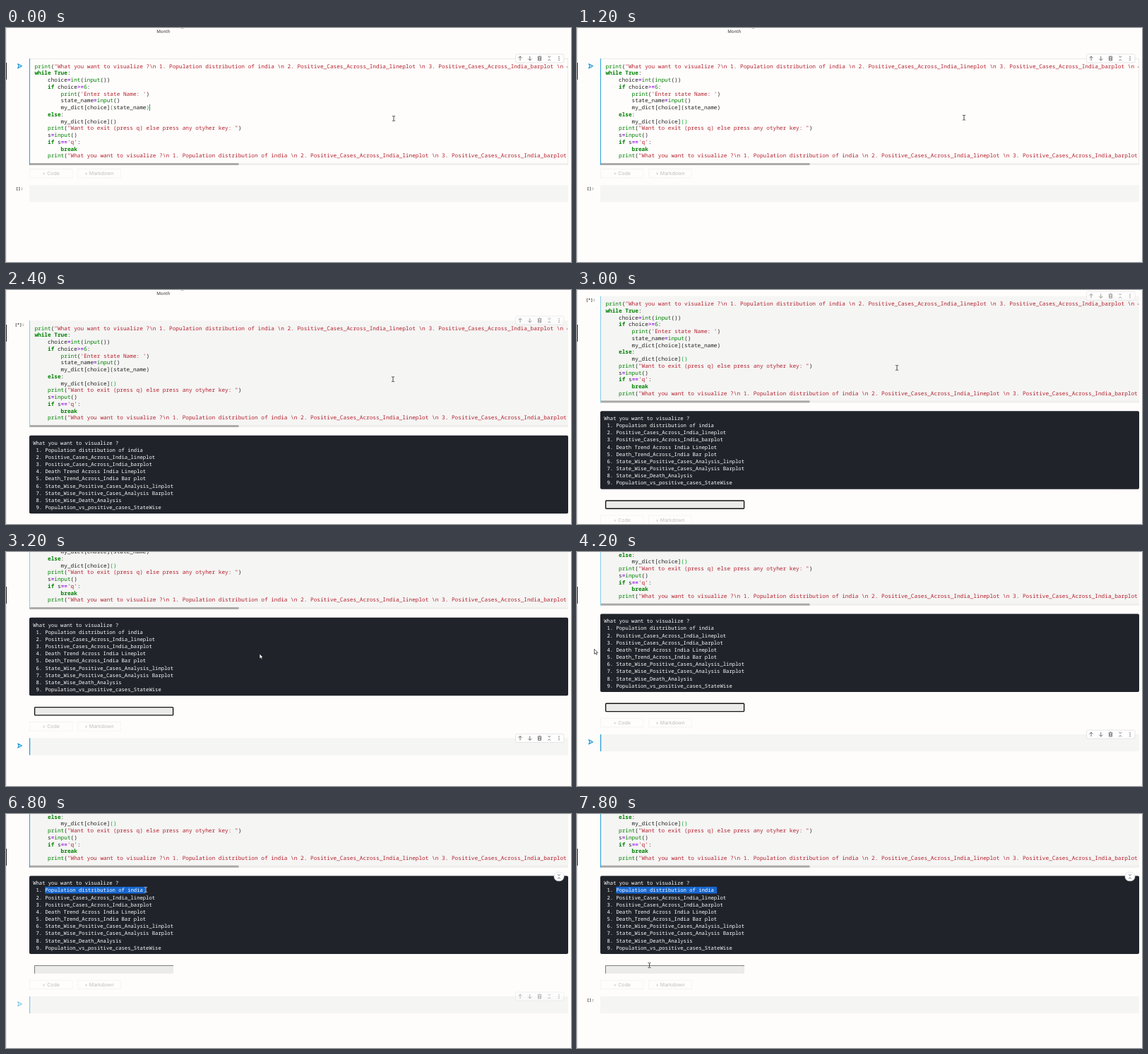
An HTML page that plays this animation: 800x331 px, repeating every 8 s.

```html
<!DOCTYPE html>
<html lang="en">
<head>
<meta charset="utf-8">
<title>Notebook run</title>
<style>
  html, body { margin: 0; width: 100%; height: 100%; overflow: hidden; background: #fefdfc; }
  svg { display: block; width: 800px; height: 331px; }
  text { white-space: pre; text-rendering: geometricPrecision; }
  .code { font: 500 7.75px "Roboto Mono", "Noto Sans Mono", "Liberation Mono", monospace; fill: #212121; }
  .out { font: 500 7.21px "Roboto Mono", "Noto Sans Mono", "Liberation Mono", monospace; fill: #fff; }
  .prompt { font: 700 5.6px "Noto Sans Mono", monospace; fill: #333; text-anchor: middle; }
  .label { font: 7px Inter, sans-serif; fill: #bfbebd; text-anchor: middle; }
  .axis { font: 500 6.2px "Open Sans", sans-serif; fill: #222; text-anchor: middle; }
  .kw { fill: #008000; font-weight: 700; }
  .fn, .num { fill: #008000; }
  .str { fill: #b3202c; }
  .op { fill: #a020f0; font-weight: 700; }
  .match { fill: #00aa22; }
  .icon { fill: none; stroke: #555; stroke-width: .8; }
</style>
</head>
<body>
<svg id="stage" viewBox="0 0 800 331"></svg>
<script>
const LOOP = 8000, STEP = 200;
const ADV = 7.75 * 0.6, LEFT = 40.4, BASE = 56.7, LEAD = 9.75;
const CLICK = 400, RUN = 1400, OUTPUT = 2400, SELECT = 6000, RELEASE = 6800;
const stage = document.getElementById('stage');

function add(parent, tag, attrs = {}, text) {
  const el = document.createElementNS('http://www.w3.org/2000/svg', tag);
  for (const k in attrs) el.setAttribute(k, attrs[k]);
  if (text !== undefined) el.textContent = text;
  parent.append(el);
  return el;
}
const group = (parent, attrs) => add(parent, 'g', attrs);
const rect = (parent, x, y, width, height, fill, more) =>
  add(parent, 'rect', { x, y, width, height, fill, ...more });
const show = (el, on) => el.setAttribute('opacity', Number(on));
const move = (el, x, y) => el.setAttribute('transform', `translate(${x} ${y})`);

const MENU = [
  'Population distribution of india', 'Positive_Cases_Across_India_lineplot',
  'Positive_Cases_Across_India_barplot', 'Death Trend Across India Lineplot',
  'Death_Trend_Across_India Bar plot', 'State_Wise_Positive_Cases_Analysis_linplot',
  'State_Wise_Positive_Cases_Analysis Barplot', 'State_Wise_Death_Analysis',
  'Population_vs_positive_cases_StateWise'
];
const ask = 'print("What you want to visualize ?' +
  MENU.slice(0, 4).map((m, i) => `\\n ${i + 1}. ${m} `).join('') + '")';
const CODE = [
  ask, 'while True:', '    choice=int(input())', '    if choice>=6:',
  "        print('Enter state Name: ')", '        state_name=input()',
  '        my_dict[choice](state_name)', '    else:', '        my_dict[choice]()',
  '    print("Want to exit (press q) else press any otyher key: ")',
  '    s=input()', "    if s=='q':", '        break', '    ' + ask
];
const TOKEN = /(".*?"|'.*?')|\b(while|True|if|else|break)\b|\b(print|int|input)\b|(\d+)|([=>]+)|([()])|([^"'()=>\d]+?(?=\b(?:while|True|if|else|break|print|int|input)\b|["'()=>\d]|$))/g;
const KINDS = ['str', 'kw', 'fn', 'num', 'op', 'paren', ''];

function codeLine(parent, line, row) {
  const src = line.trimStart();
  const text = add(parent, 'text', {
    class: 'code', x: LEFT + (line.length - src.length) * ADV, y: BASE + row * LEAD
  });
  for (const m of src.matchAll(TOKEN)) {
    const kind = KINDS[m.slice(1).findIndex(g => g !== undefined)];
    add(text, 'tspan', { class: kind }, m[0]);
  }
  return [...text.querySelectorAll('.paren')];
}

const CHEVRONS = 'M-1.8 -3.2L0 -1.4L1.8 -3.2M-1.8 3.2L0 1.4L1.8 3.2';
function toolbar(parent, y) {
  const g = group(parent, { transform: `translate(0 ${y})` });
  rect(g, 721.5, -6, 68.5, 12, '#fffefe', { rx: 2, stroke: '#dddcdb', 'stroke-width': .7 });
  const icons = [
    'M0 3V-3M-2.5 -.5L0 -3L2.5 -.5', 'M0 -3V3M-2.5 .5L0 3L2.5 .5',
    'M-2.8 -2.2H2.8M-1 -3.1H1M-2 -2V3H2V-2M-.7 -.8V1.8M.7 -.8V1.8', CHEVRONS
  ];
  icons.forEach((d, i) =>
    add(g, 'path', { d, class: 'icon', transform: `translate(${728 + i * 13.75} 0)` }));
  for (const dy of [-2.4, 0, 2.4]) add(g, 'circle', { cx: 783, cy: dy, r: .65, fill: '#444' });
  return g;
}

function playIcon(parent, y) {
  return add(parent, 'path', {
    d: `M16.7 ${y - 3.1}L22.4 ${y}L16.7 ${y + 3.1}L18 ${y}Z`, fill: '#d3ecf8',
    stroke: '#1c9bd7', 'stroke-width': 1.1, 'stroke-linejoin': 'round'
  });
}

function button(parent, x, label) {
  rect(parent, x, 199.5, 60.5, 12.5, 'none', { stroke: '#f3f2f1', 'stroke-width': .8 });
  add(parent, 'text', { class: 'label', x: x + 30.2, y: 208.3 }, label);
}

// Scrolling page
const page = group(stage);
add(page, 'text', { class: 'axis', x: 222.7, y: 6.7 }, 'Month');
rect(page, 247.5, 0, 4, .6, '#999');

const cellBg = rect(page, 33, 43.3, 763, 150.7, '#f5f5f4');
const cellFrame = rect(page, 33.5, 43.5, 762, 150, 'none', { stroke: '#e6e6e5', 'stroke-width': .8 });
rect(page, 33, 191.1, 763, 2.9, '#f0efee');
rect(page, 33, 191.1, 296.5, 2.9, '#aaa9a8');
const cellEdge = rect(page, 33, 43.3, 1, 150.7, '#2a9fd6');
const clip = add(add(stage, 'defs'), 'clipPath', { id: 'cellClip' });
rect(clip, 33, 40, 762, 156);
const codeBox = group(page, { 'clip-path': 'url(#cellClip)' });
const parens = CODE.map((line, i) => codeLine(codeBox, line, i));
const caret = rect(page, 0, 0, .6, 9, '#111');
const runIcon = playIcon(page, 53.8);
const busy = add(page, 'text', { class: 'prompt', x: 19.2, y: 50.6 }, '[*]:');
const cellTools = toolbar(page, 43);

// Output block
const out = group(page);
rect(out, 33, 205.8, 763, 110.5, '#20232a', { rx: 2 });
const mark = rect(out, 55.3, 221.2, 0, 9.6, '#1767cf');
['What you want to visualize ?', ...MENU.map((m, i) => ` ${i + 1}. ${m}`)].forEach((s, i) =>
  add(out, 'text', { class: 'out', x: 38.2, y: 218.5 + i * 10.17 }, s));
const focusBox = rect(out, 40.6, 332.6, 196, 11.3, '#ebebea',
  { rx: 1, stroke: '#151515', 'stroke-width': 1.4 });
const plainBox = group(out);
rect(plainBox, 40, 332.2, 197, 11.8, '#ebebea');
add(plainBox, 'path', { d: 'M40.5 344V332.7H237', fill: 'none', stroke: '#7b7b7b' });
const inputCaret = rect(out, 43.2, 334.3, .7, 8, '#333');
const collapse = group(out, { transform: 'translate(783 206.8)' });
rect(collapse, -7, -6.3, 14, 12.6, '#fffefe', { rx: 6, stroke: '#d5d5d5', 'stroke-width': .6 });
add(collapse, 'path', { d: CHEVRONS, class: 'icon' });

// Insert buttons and the following cell
const tail = group(page);
button(tail, 33.5, '+ Code');
button(tail, 101.8, '+ Markdown');
rect(tail, 33, 222.3, 763, 24, '#f5f5f4');
const nextEdge = rect(tail, 33, 222.3, 1.2, 24, '#1c9bd7');
const nextRun = playIcon(tail, 233);
const idle = add(tail, 'text', { class: 'prompt', x: 19, y: 229.4 }, '[]:');
const nextTools = toolbar(tail, 222.3);

// Fixed edge marks
rect(stage, 0, 0, 1, 331, '#e6e5e4');
rect(stage, 0, 49, 1, 24, '#222');

const beam = add(stage, 'path', {
  d: 'M-2 -3.5Q0 -3.5 0 -2.6Q0 -3.5 2 -3.5M0 -2.6V2.6M-2 3.5Q0 3.5 0 2.6Q0 3.5 2 3.5',
  fill: 'none', 'stroke-width': .8
});
const arrow = add(stage, 'path', {
  d: 'M-1 -4V3L.7 1.5L1.8 4L3 3.4L1.9 1H4Z', fill: '#fff', stroke: '#222', 'stroke-width': .7
});

const MOUSE = [
  [0, 549, 128], [200, 548.5, 127.5], [600, 548, 127], [2000, 548, 126.5], [2600, 548, 126],
  [3000, 453, 110], [3200, 360, 148], [3800, 60, 142], [4200, 25.5, 141.3], [4800, 25.5, 141.3],
  [5400, 54, 107], [6000, 54, 107], [6600, 198, 107], [6800, 198, 107], [7800, 102.5, 214]
];
const SCROLL = [[0, 0], [2600, -34.6], [3200, -113], [3400, -118.3]];

function mouseAt(t) {
  const i = MOUSE.findIndex(k => k[0] > t);
  if (i < 0) return MOUSE.at(-1).slice(1);
  const [a, b] = [MOUSE[i - 1], MOUSE[i]];
  const p = (t - a[0]) / (b[0] - a[0]);
  return [a[1] + (b[1] - a[1]) * p, a[2] + (b[2] - a[2]) * p];
}

function draw(t) {
  const scroll = SCROLL.findLast(k => k[0] <= t)[1];
  const [x, y] = mouseAt(t);
  const ran = t >= RUN, printed = t >= OUTPUT, released = t >= RELEASE;
  move(page, 0, scroll);
  move(tail, 0, printed ? 154 : 0);

  cellBg.setAttribute('fill', ran ? '#f5f5f4' : '#fefdfc');
  cellEdge.setAttribute('fill', ran && !released ? '#7fd0e6' : '#2a9fd6');
  show(cellFrame, !ran);
  show(runIcon, !ran);
  show(busy, ran);
  show(cellTools, t >= 3200 ? 0 : ran ? .7 : 1);
  const row = t < CLICK ? 6 : 8;
  for (const r of [6, 8])
    parens[r].forEach(p => p.setAttribute('class', r === row ? 'match' : 'paren'));
  move(caret, LEFT + CODE[row].length * ADV, BASE - 7.3 + row * LEAD);
  show(caret, !ran && (t < CLICK || (t - CLICK) % 1000 < 500));

  show(out, printed);
  mark.setAttribute('width', t < SELECT ? 0 : released ? 142.7 : Math.max(0, x - 55.3));
  show(focusBox, !released);
  show(plainBox, released);
  show(inputCaret, !released && t % 1000 >= 500);
  show(collapse, released);

  // The following cell fades out over one step once the output is clicked
  const active = !ran || t > RELEASE ? 0 : released ? .5 : 1;
  for (const el of [nextEdge, nextRun, nextTools]) show(el, active);
  show(idle, active === 0);

  const isArrow = t >= 3200 && t < 5200;
  const overDark = printed && y > 205.8 + scroll && y < 316.3 + scroll;
  show(arrow, isArrow);
  show(beam, !isArrow);
  beam.setAttribute('stroke', overDark ? '#ddd' : '#222');
  move(arrow, x, y);
  move(beam, x, y);
}

const start = performance.now();
function tick() {
  const t = (performance.now() - start) % LOOP;
  draw(Math.floor(t / STEP) * STEP);
  requestAnimationFrame(tick);
}
tick();
</script>
</body>
</html>
```
